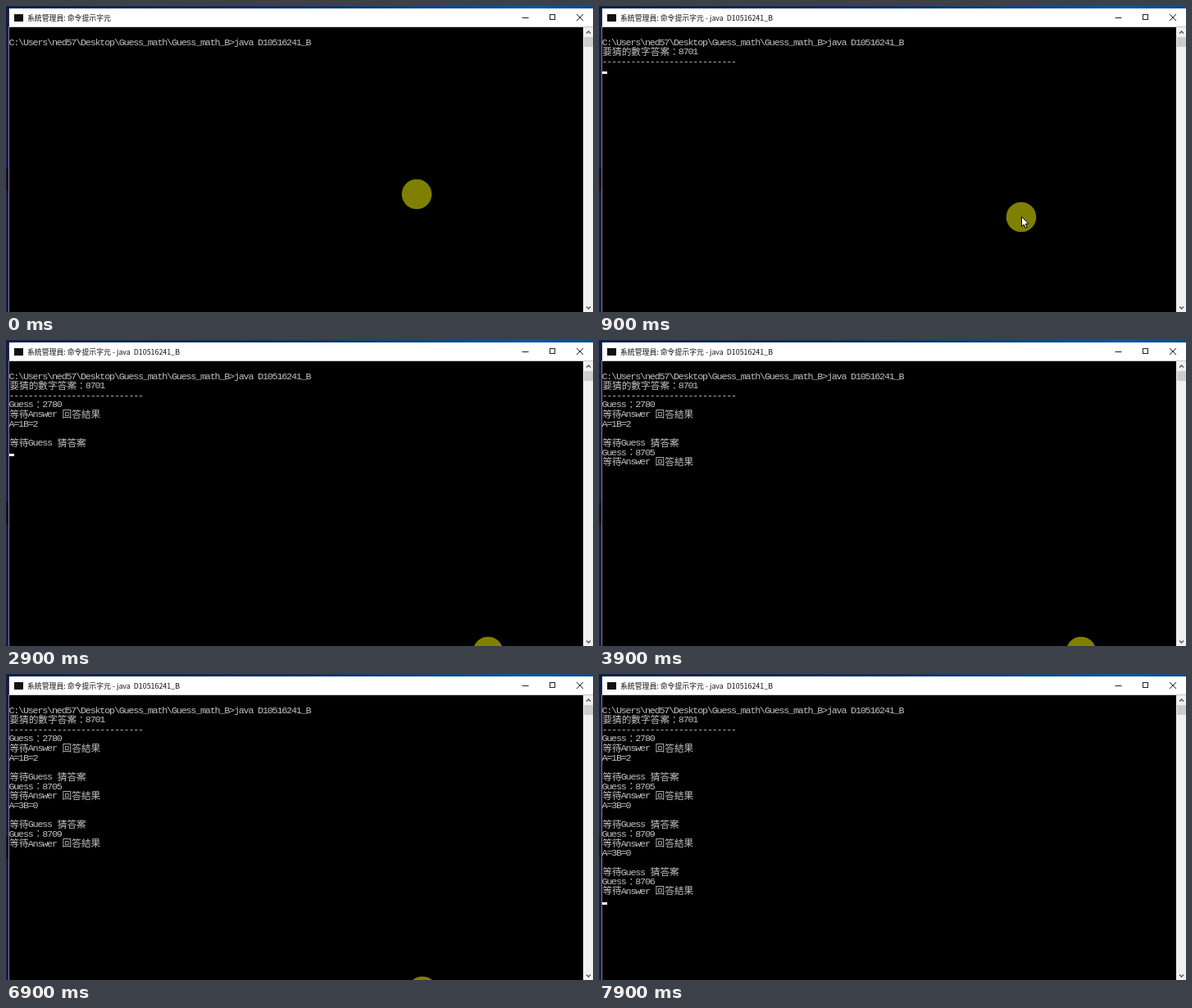
Write an HTML page with a canvas that moves like this. It is 716x374 px and loops after 8000 ms.

```html
<!DOCTYPE html>
<html lang="zh-Hant">
<meta charset="utf-8">
<title>Console</title>
<style>
html, body { margin: 0; width: 100%; height: 100%; overflow: hidden; background: #000; }
canvas { display: block; }
</style>
<canvas width="716" height="374"></canvas>
<script>
const c = document.querySelector('canvas').getContext('2d');
const LOOP = 8000, CELL = 5.84, PITCH = 11.66, TOP = 43.5;
const CJK = '"Noto Sans CJK TC", "Noto Sans CJK", sans-serif';
const MONO = '11.8px "Liberation Mono", monospace';
const WAIT = '等待Answer 回答結果', NEXT = '等待Guess 猜答案';

// Blocks of console output: [time, lines...]
const output = [
  [0, 'C:\\Users\\ned57\\Desktop\\Guess_math\\Guess_math_B>java D10516241_B'],
  [500, '要猜的數字答案：8701', '-'.repeat(28)],
  [1900, 'Guess：2780', WAIT],
  [2900, 'A=1B=2', '', NEXT],
  [3900, 'Guess：8705', WAIT],
  [4900, 'A=3B=0', '', NEXT],
  [5900, 'Guess：8709', WAIT],
  [7100, 'A=3B=0', '', NEXT],
  [7900, 'Guess：8706', WAIT]
];
// Text cursor on/off changes
const blinks = [[0, 0], [200, 1], [1600, 0], [2700, 1], [3700, 0], [4900, 1], [5900, 0], [7100, 1], [7500, 0], [7900, 1]];
// Mouse path: [time, x, y]
const path = [[0, 501, 230], [500, 501, 230], [900, 515, 258], [1100, 588, 381],
  [6600, 588, 381], [6900, 508, 388], [7100, 455, 410], [LOOP, 455, 410]];

function rect(x, y, w, h, color) {
  c.fillStyle = color;
  c.fillRect(x, y, w, h);
}

function poly(color, ...points) {
  c.strokeStyle = color;
  c.beginPath();
  points.forEach(([x, y]) => c.lineTo(x, y));
  c.stroke();
}

function drawLine(text, row) {
  let x = 4;
  const y = TOP + row * PITCH;
  c.fillStyle = '#c0c0c0';
  for (const ch of text) {
    const wide = ch > '\u2fff';
    c.font = wide ? '300 11.7px ' + CJK : MONO;
    c.fillText(ch, wide ? x + 0.3 : x - 0.6, y + (wide ? 4.4 : 4));
    x += wide ? 2 * CELL : CELL;
  }
}

function drawWindow(t) {
  const sky = c.createLinearGradient(0, 0, 716, 0);
  sky.addColorStop(0, '#08204a');
  sky.addColorStop(0.5, '#0a3268');
  sky.addColorStop(0.9, '#0c569e');
  sky.addColorStop(1, '#0c4a8c');
  rect(0, 0, 716, 374, sky);
  rect(0, 198, 3, 27, '#061228');
  rect(3, 3, 1, 22, '#4a2c38');
  rect(3, 25, 1, 349, '#a07088');
  rect(4, 3, 712, 22, '#fff');
  rect(4, 25, 712, 1, '#c8c8c8');
  rect(4, 26, 700, 348, '#000');
  rect(704, 26, 12, 348, '#f0f0f0');
  rect(705, 38, 11, 12, '#cdcdcd');
  rect(10, 10, 11, 9, '#111');

  c.font = '8.87px ' + CJK;
  c.fillStyle = '#111';
  c.fillText('系統管理員: 命令提示字元' + (t >= 100 ? ' - java\u00a0 D10516241_B' : ''), 26, 17.6);

  c.lineWidth = 1;
  poly('#222', [629.5, 14.5], [637.5, 14.5]);
  c.strokeRect(663.5, 10.5, 6, 6);
  poly('#222', [696, 10], [704, 18]);
  poly('#222', [704, 10], [696, 18]);
  c.lineWidth = 1.3;
  poly('#505050', [708, 33.5], [710.5, 31], [713, 33.5]);
  poly('#505050', [708, 367.5], [710.5, 370], [713, 367.5]);
}

function drawMouse(t) {
  const i = path.findIndex(p => p[0] > t);
  const [t0, x0, y0] = path[i - 1], [t1, x1, y1] = path[i];
  const k = (t - t0) / (t1 - t0);
  const x = x0 + (x1 - x0) * k, y = y0 + (y1 - y0) * k;
  c.fillStyle = '#808000';
  c.beginPath();
  c.arc(x, y, 18.3, 0, 7);
  c.fill();
  if (t <= 500) return;
  c.save();
  c.translate(x + 0.5, y - 0.5);
  c.fillStyle = '#fff';
  c.strokeStyle = '#000';
  c.lineWidth = 1;
  c.beginPath();
  [[0, 0], [0, 12], [2.7, 9.5], [4.6, 13.8], [6.6, 13], [4.7, 8.8], [8.4, 8.6]].forEach(p => c.lineTo(...p));
  c.closePath();
  c.fill();
  c.stroke();
  c.restore();
}

function draw(now) {
  // The screen refreshes ten times a second
  const t = Math.floor(now % LOOP / 100) * 100;
  drawWindow(t);
  const lines = output.filter(b => b[0] <= t).flatMap(b => b.slice(1));
  lines.forEach(drawLine);
  if (blinks.filter(b => b[0] <= t).pop()[1]) {
    rect(4, Math.round(TOP + lines.length * PITCH + 2), 6, 3, '#fff');
  }
  drawMouse(t);
}

const start = performance.now();
function tick() {
  draw(performance.now() - start);
  requestAnimationFrame(tick);
}
tick();
</script>
</html>
```
